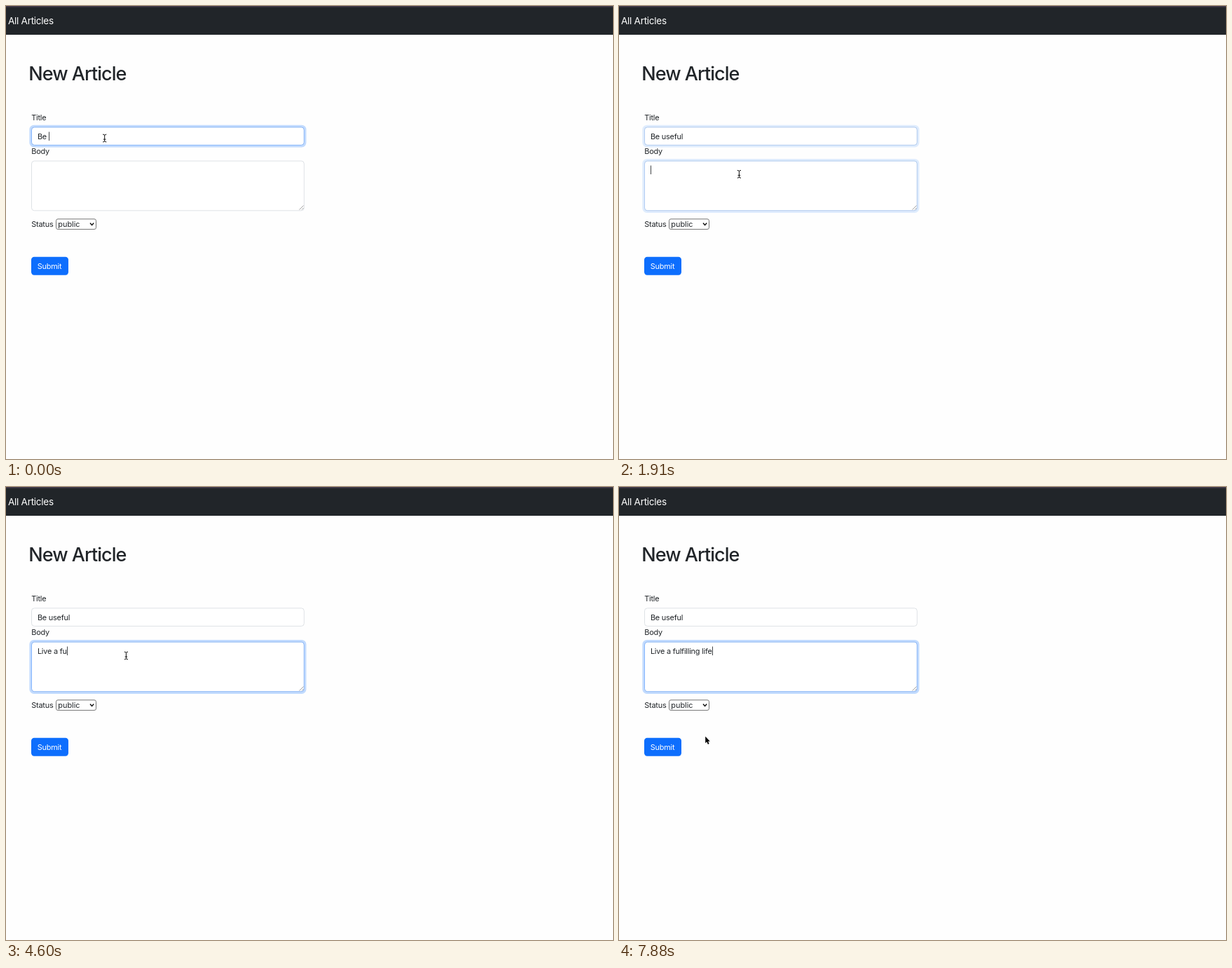
Animation of 866 by 646 pixels, one loop 8 s. Source, as an HTML page:

```html
<!DOCTYPE html>
<html lang="en">
<head>
<meta charset="utf-8">
<title>New Article</title>
<style>
  html, body { margin: 0; width: 100%; height: 100%; overflow: hidden; background: #fefefe; }
  svg { display: block; width: 100%; height: 100%; }
  text {
    font: 400 10.9px Inter, "Open Sans", sans-serif;
    font-optical-sizing: none;
    letter-spacing: -.22px;
    fill: #212529;
  }
  text.brand { font-size: 13.6px; letter-spacing: -.3px; fill: #fff; }
  text.heading { font-size: 27px; font-weight: 500; letter-spacing: -.96px; }
  text.light { fill: #fff; }
  .ring { fill: #c2dbfe; }
  .box { fill: #fff; stroke: #dee2e6; }
  .focus { fill: none; stroke: #86b7fe; }
</style>
</head>
<body>
<svg viewBox="0 0 866 646">
  <rect width="866" height="646" fill="#fefefe"/>
  <rect width="866" height="41" fill="#212529"/>
  <rect width="866" height="1.6" fill="#433a4a"/>
  <text class="brand" x="3" y="26">All Articles</text>
  <text class="heading" x="32.3" y="106.3">New Article</text>

  <g id="title"></g>
  <g id="body"></g>
  <path d="M418.5 290.5l6-6M422 290.5l2.5-2.5" stroke="#8a8a8a" stroke-width=".8"/>
  <text x="36.3" y="163">Title</text>
  <text x="36.3" y="211">Body</text>
  <text x="36.3" y="315">Status</text>

  <rect x="71.5" y="303.8" width="57" height="14.6" rx="2.5" fill="#fff" stroke="#767676"/>
  <text x="74.3" y="315" style="letter-spacing:0">public</text>
  <path d="M120 309.6l2.6 2.8 2.6-2.8" fill="none" stroke="#111" stroke-width="1.5"/>

  <rect x="36" y="357.8" width="53" height="26" rx="4.2" fill="#0d6efd"/>
  <text class="light" x="44.8" y="375">Submit</text>

  <g id="beam" fill="none" stroke-linecap="round">
    <path id="beamShape" d="M-2.2-5.4Q0-5.4 0-4Q0-5.4 2.2-5.4M0-4V4M-2.2 5.4Q0 5.4 0 4Q0 5.4 2.2 5.4M-1.4 1.6H1.4" stroke="#fff" stroke-width="2"/>
    <use href="#beamShape"/>
    <path d="M-2.2-5.4Q0-5.4 0-4Q0-5.4 2.2-5.4M0-4V4M-2.2 5.4Q0 5.4 0 4Q0 5.4 2.2 5.4M-1.4 1.6H1.4" stroke="#111" stroke-width="1"/>
  </g>
  <path id="arrow" d="M0 0V9.4L2.1 7.5 3.7 11.1 5.4 10.3 3.8 6.9H6.6Z" fill="#000" stroke="#fff" stroke-width=".8" paint-order="stroke"/>
</svg>
<script>
const LOOP = 8000;
const $ = id => document.getElementById(id);

function add(parent, tag, attrs) {
  const el = document.createElementNS("http://www.w3.org/2000/svg", tag);
  for (const key in attrs) el.setAttribute(key, attrs[key]);
  return parent.appendChild(el);
}

function makeField(id, y, height, baseline) {
  const g = $(id);
  const frame = { x: 36.5, y, width: 388.8, height, rx: 4 };
  const ring = add(g, "rect", { class: "ring", x: 33.4, y: y - 3.1, width: 395, height: height + 6.2, rx: 6.5 });
  add(g, "rect", { class: "box", ...frame });
  const focus = add(g, "rect", { class: "focus", ...frame });
  const text = add(g, "text", { x: 44.9, y: baseline });
  const caret = add(g, "rect", { y: baseline - 10.5, width: 1, height: 12.5, fill: "#212529", opacity: .85 });
  return (value, focused, caretOn) => {
    text.textContent = value.replace(/ /g, "\u00a0");
    ring.setAttribute("opacity", focused);
    focus.setAttribute("opacity", focused);
    const width = value ? text.getComputedTextLength() : 0;
    caret.setAttribute("x", Math.round(45 + width));
    caret.setAttribute("visibility", caretOn ? "visible" : "hidden");
  };
}

const drawTitle = makeField("title", 172.8, 25.6, 190);
const drawBody = makeField("body", 221, 70.8, 238);

// Typing bursts: start time, gap between keys, number of keys
const titleKeys = [[300, 145, 4], [880, 0, 2]];
const bodyKeys = [
  [2810, 150, 6], [4010, 0, 1], [4310, 148, 7], [5500, 150, 2],
  [5800, 0, 2], [6090, 0, 1], [6390, 0, 1], [6690, 0, 2]
];

function typed(bursts, t) {
  let n = 0;
  for (const [start, gap, count] of bursts) {
    if (t < start) break;
    n += gap ? Math.min(count, 1 + Math.floor((t - start) / gap)) : count;
  }
  return n;
}

// Pointer stops: time, x, y
const stops = [
  [0, 140.7, 188.5], [1480, 149, 204], [1620, 165, 230], [1760, 171.4, 239.8], [2060, 171.4, 240.5],
  [7430, 165, 257], [7580, 146, 303], [7730, 129, 342], [7880, 123.2, 355.8]
];

const within = (t, from, to) => t >= from && t < to;

function render(t) {
  const focus = t < 1910 ? 0 : t < 2060 ? .5 : 1;
  drawTitle("Be useful".slice(0, 3 + typed(titleKeys, t)), 1 - focus, t < 1330);
  drawBody("Live a fulfilling life".slice(0, typed(bodyKeys, t)), focus,
    within(t, 1910, 2360) || within(t, 2810, 7290) || t >= 7730);

  const [, x, y] = stops.filter(stop => stop[0] <= t).pop();
  const overField = y < 295;
  for (const [id, on] of [["beam", overField], ["arrow", !overField]]) {
    $(id).setAttribute("transform", `translate(${x} ${y})`);
    $(id).setAttribute("visibility", on ? "visible" : "hidden");
  }
}

const begin = performance.now();
function tick() {
  render((performance.now() - begin) % LOOP);
  requestAnimationFrame(tick);
}
tick();
</script>
</body>
</html>
```
